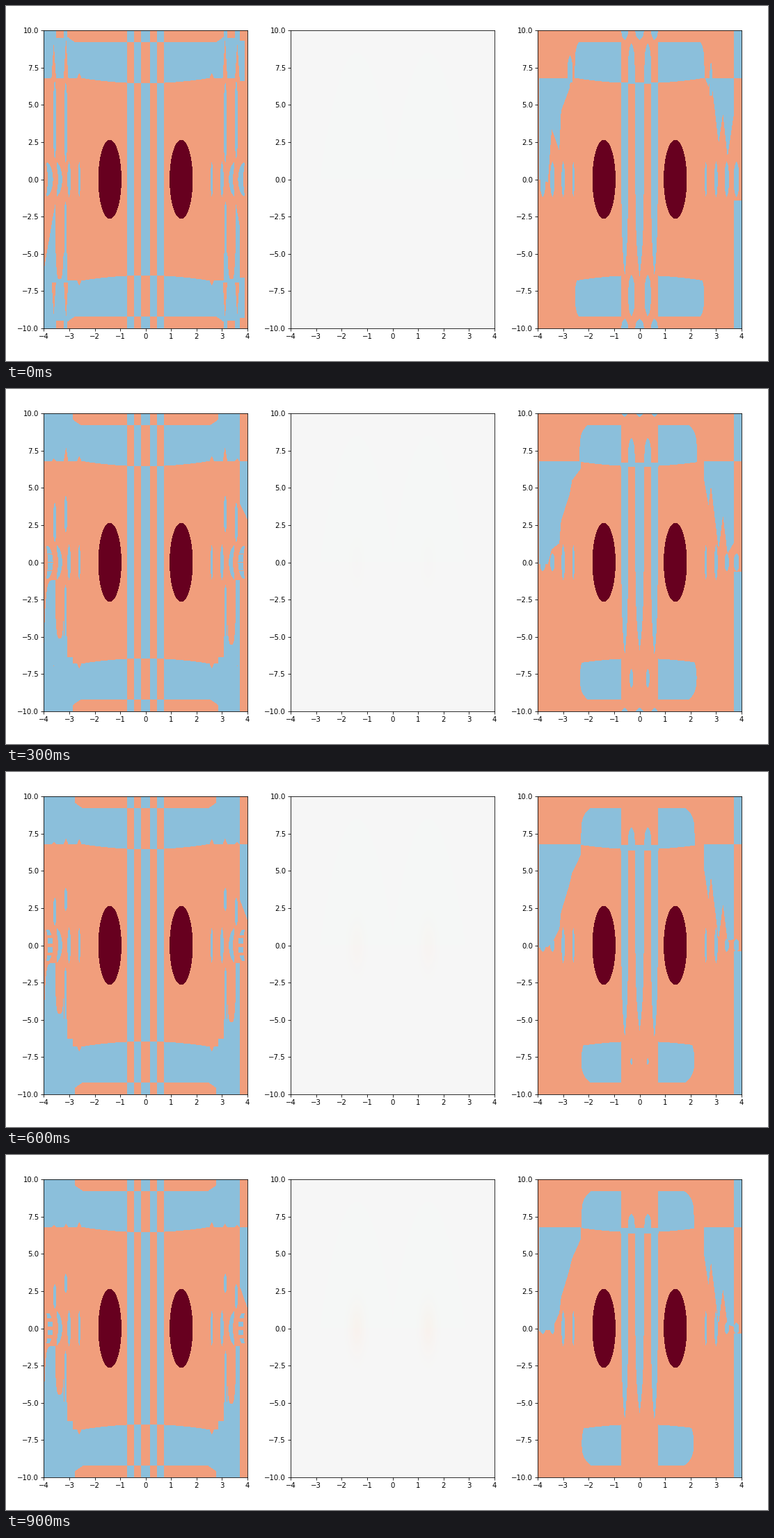
Animation of 1095x511 px, one loop 1 s. Source, as a matplotlib script:

```python
import numpy as np
import matplotlib.pyplot as plt
from matplotlib.animation import FuncAnimation

W, H, DPI = 1095, 511, 73
PW, PH, BOTTOM, STEP = 292.6, 428.4, 47.3, 354.9
NX, NY = 293, 429
PALETTE = np.array([(241, 158, 124), (139, 191, 219), (103, 0, 31)], np.uint8)

X, Y = np.meshgrid(-4 + 8 * (np.arange(NX) + 0.5) / NX,
                   10 - 20 * (np.arange(NY) + 0.5) / NY)
R, V = abs(X), abs(Y)

EGGS = ((R - 1.4) / 0.455) ** 2 + (Y / 2.65) ** 2 < 1
COLUMNS = (R < 0.17) | (abs(R - 0.583) < 0.135)
SAG = 6.45 + 0.055 * np.minimum(R, 2.5) ** 2
TOP = 9.22


def lens(c, w, lo, hi):
    """Mirrored upright sliver, narrow at both ends."""
    s = (2 * Y - lo - hi) / (hi - lo)
    return abs(R - c) < w * (1 - s ** 4)


def spike(c, w, base, tip):
    """Strip from base, narrowing towards tip."""
    s = (Y - base) / (tip - base)
    return (s > 0) & (s < 1) & (abs(X - c) < w * (1 - s ** 6))


def cusp(c, height, w=0.09):
    return height * np.clip(1 - abs(R - c) / w, 0, 1)


def slits(bend, outer):
    """Rows of short slits beside the centre line."""
    mask = np.zeros_like(EGGS)
    for i, c in enumerate((2.6, 3.0, 3.42, 3.8)):
        half = 1.2 * (outer if i > 1 else 1)
        curve = bend * (1 - 2 * (Y / 1.2) ** 2) * (i > 1)
        s = Y / half
        mask |= abs(R - c + curve) < (0.04 + 0.02 * i) * (1 - s ** 4)
    return mask


def floor_curve(xs, start, end, e):
    return np.interp(X, xs, e * np.array(start) + (1 - e) * np.array(end))


def left_field(e):
    fast = e ** 4
    crack = np.where(Y > 0, 0.15 + 2.6 * e, 2.6 * fast)
    edge = SAG + cusp(2.6, 0.35) + cusp(3.12, crack) + cusp(3.6, 0.15 + 2.2 * fast)
    cap = 2.75 + 0.33 * e - 0.3 * np.clip(1 - (V - TOP) / 0.35, 0, 1)
    blue = (V > edge) & ((V < TOP) | (R > cap))
    blue &= ~((abs(R - 3.35) < 0.15) & (V > 10 - 0.5 * fast))

    # lower flanks with a hanging finger on each side
    finger = -(4.4 + 2.3 * e + 0.6 * (X > 0) * (1 - e))
    flank = np.select(
        [R > 3.53, R > 3.2, R > 3.08],
        [-1.2 - 5 * (2 * np.maximum(R - 3.5, 0)) ** (1 + 8 * (1 - e)),
         finger * (1 - 0.4 * ((R - 3.37) / 0.17) ** 4),
         -1.5 - 5 * ((R - 3.14) / 0.06) ** 4],
        -SAG + 0.6 * (1 - e) * (R > 2.85))
    blue |= (Y < flank) & (Y > -6.9) & (R > 2.85)

    # the strip at the right edge has the opposite sign
    drop = 2.7 + 4.1 * e - 5 * (X - 3.7) * (1 - e)
    blue = np.where(X > 3.7, (Y < 6.8) & (Y > drop), blue)
    blue |= (X > 3.6) & (abs(X - 3.8) < 0.1 * fast) & (V > 6.6) & (V < 9.3)

    blue |= lens(3.13, 0.06, 1 + 1.4 * (1 - e), 3.6 + 3 * e)
    blue |= lens(3.56, 0.06, 1.3, 2.9 + 3.8 * e)
    blue |= slits(0.07, 1) & ((R < 3.6) | (np.cos(11 * Y) < 0.2 + 2.5 * e))
    return blue ^ COLUMNS


def right_field(e):
    fast, slow = e ** 4, e ** 0.5
    s = (V - 6.5) / (TOP - 6.5)
    rim = (2.27 + 0.27 * e - 0.15 * (1 - e) * (X > 0)
           - (0.4 - 0.25 * e) * np.clip(s, 0, 1) ** 6
           - 0.15 * (Y < 0) * np.clip(1 - s, 0, 1) ** 6)
    blue = (V > SAG) & (V < TOP) & (R > 0.72) & (R < rim)
    blue |= (abs(Y - 6.55) < 0.2 * (1 - e)) & (R < 0.75)

    for c, w, lift in ((-0.583, 0.135, 0.35), (0, 0.17, 0.85), (0.583, 0.135, 0.3)):
        blue |= spike(c, w, 6.5, -6.5 + lift * (1 - e))
        for side in (-1, 1):
            blue |= spike(c, w, side * 10.6, side * (10.25 - 0.9 * slow))
    for c in (-0.32, 0.32):
        blue |= spike(c, 0.13, 6.4, 7.4 + 1.75 * slow)
    half = 1.4 * (1.2 * slow - 0.2)
    if half > 0:
        blue |= lens(0.32, 0.12 * slow, -7.8 - half, -7.8 + half)

    # ragged regions hanging below the upper line on both flanks
    left = floor_curve((-3.95, -3.6, -3.45, -3.15, -3.08, -2.75, -2.65, -2.3),
                       (0, -0.2, 3.4, 1.9, 4.6, 6.1, 7.6, 7),
                       (-0.2, -0.1, -0.2, 1, 2, 3.9, 4.6, 6), e)
    right = floor_curve((2.53, 2.7, 2.8, 3.1, 3.27, 3.45, 3.7),
                        (7, 6.2, 6.9, 2.4, 4.4, 1.5, 4.4),
                        (4.9, 2.8, 4.4, 0.2, 2.6, 0.2, 0), e)
    blue |= (Y < 6.8) & (X > -3.95) & (X < -2.3) & (Y > left)
    blue |= (Y < 6.8) & (X > 2.53) & (X < 3.7) & (Y > right)
    blue |= spike(-2.73, 0.1, 6.5, 6.6 + 1.7 * fast)
    blue |= spike(2.8, 0.05, 5.6, 6.3 + 1.6 * e ** 2)

    blue |= (X > 3.7) & ((Y > 6.8) | (Y < -0.3 - 1.1 * e))
    return blue | slits(0, 0.3 + 0.7 * e)


def paint(blue):
    return PALETTE[np.where(EGGS, 2, blue.astype(int))]


def faint_field(t):
    arch = (Y > 0) & (Y < 8.5 - 4 * (R - 1.4) ** 2)
    glow = (t / 9) ** 1.5 * np.exp(-((R - 1.4) / 0.3) ** 2 - (Y / 1.6) ** 2)
    rgb = 246 + arch[..., None] * np.array([-1, 1, 0])
    return np.round(rgb + glow[..., None] * np.array([2, -4, -8])).astype(np.uint8)


def frame(t):
    e = np.exp(-t / 2.5)
    return paint(left_field(e)), faint_field(t), paint(right_field(e))


fig = plt.figure(figsize=(W / DPI, H / DPI), dpi=DPI, facecolor="white")
images = []
for i, data in enumerate(frame(0)):
    ax = fig.add_axes([(54.4 + i * STEP) / W, BOTTOM / H, PW / W, PH / H])
    images.append(ax.imshow(data, extent=(-4, 4, -10, 10), aspect="auto",
                            interpolation="nearest"))
    ax.set(xticks=np.arange(-4, 5), yticks=np.arange(-10, 10.1, 2.5))


def update(t):
    for image, data in zip(images, frame(t)):
        image.set_data(data)
    return images


anim = FuncAnimation(fig, update, frames=10, interval=100, repeat=True,
                     repeat_delay=0, blit=False)
plt.show()
```
